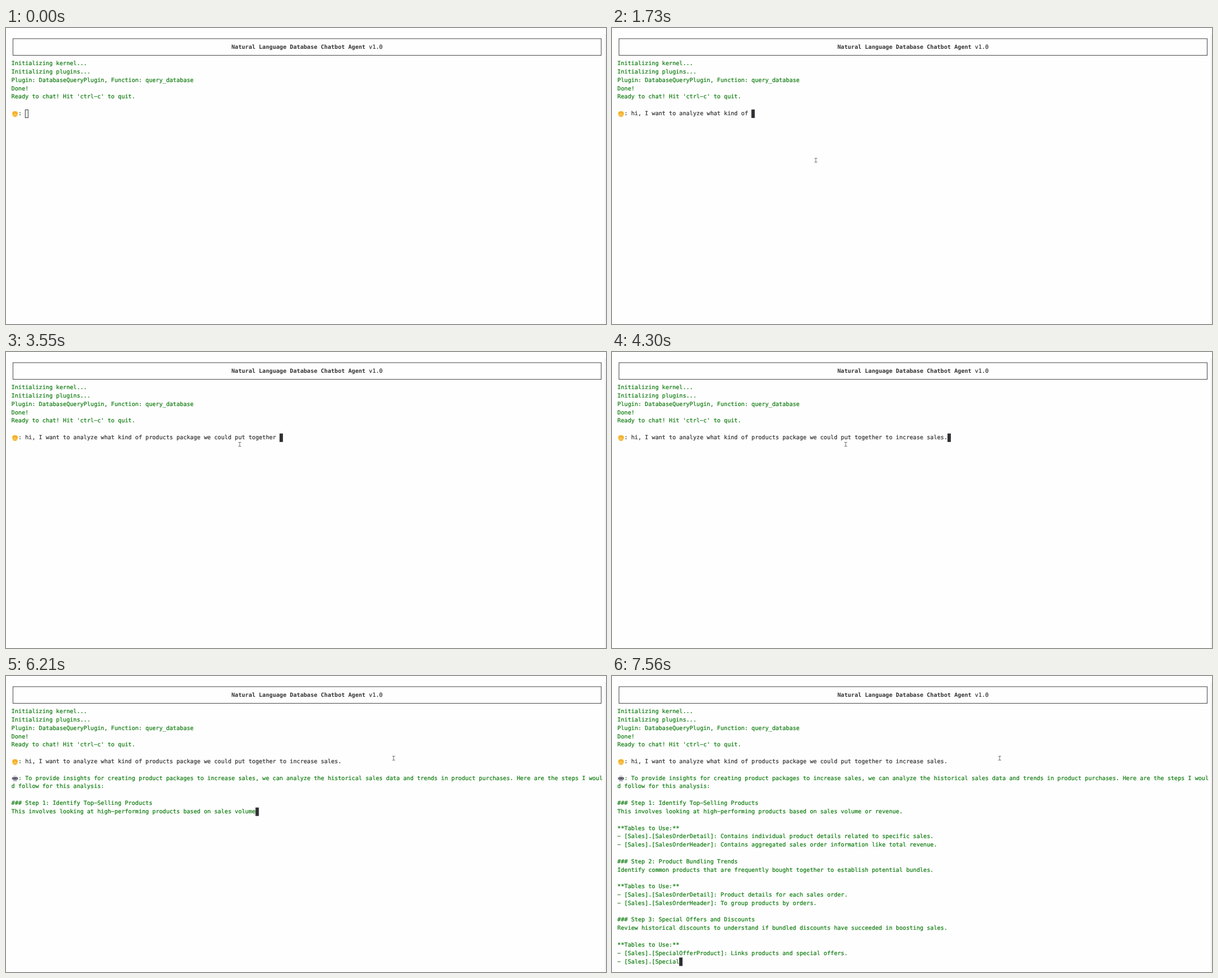
Recreate the animation shown at these times as an HTML page. Size 1064 by 526 pixels, loop 8 s.

```html
<!DOCTYPE html>
<html lang="en">
<head>
<meta charset="utf-8">
<title>Chatbot terminal</title>
<style>
  :root { --lh: 14.81px; --x0: 9.6px; --y0: 57.2px; }
  html, body { margin: 0; width: 100%; height: 100%; overflow: hidden; background: #fefefe; }
  #stage { position: absolute; left: 0; top: 0; width: 1064px; height: 526px; overflow: hidden; }
  #stage > * { position: absolute; }
  pre {
    margin: 0; left: var(--x0); top: calc(var(--y0) + var(--row) * var(--lh));
    font: 10.132px/14.81px "DejaVu Sans Mono", monospace;
    text-rendering: geometricPrecision; font-variant-ligatures: none;
    -webkit-text-stroke: .22px; white-space: pre; color: #333;
  }
  b { -webkit-text-stroke: 0; }
  .green { color: #107c10; }
  #panel { left: 0; top: 0; width: 1064px; height: 56px; }
  #edge { left: 1062px; top: 11px; width: 1px; bottom: 0; background: #e6e6e6; }
  #cursor { left: 0; top: 0; width: 6.1px; height: 14.8px; box-sizing: border-box; background: #303034; }
  #cursor.hollow { background: none; border: 1px solid #303034; }
  .emoji { left: 10.4px; width: 12px; height: 12px; }
  #mouse { left: 0; top: 0; width: 5px; height: 8px; }
</style>
</head>
<body>
<div id="stage">
  <svg id="panel"><rect x="12.35" y="18.97" width="1043.1" height="29.62" fill="none" stroke="#444"/></svg>
  <div id="edge"></div>
  <pre id="title" style="--row:-2"></pre>
  <pre id="boot" class="green" style="--row:0"></pre>
  <pre id="question" style="--row:6"></pre>
  <pre id="answer" class="green" style="--row:8"></pre>
  <svg class="emoji" style="top:146.6px" viewBox="0 0 12 12">
    <path d="M1 5Q1 .8 6 .8Q11 .8 11 5Q11 9 8.6 10.6Q6 12 3.4 10.6Q1 9 1 5Z" fill="#f7b52c"/>
    <path d="M2.4 6Q4.6 5.4 6 3.8Q7.4 5.4 9.6 6Q9.4 10.6 6 10.8Q2.6 10.6 2.4 6Z" fill="#fcc750"/>
    <path d="M1.6 5.4Q4.6 5 6 3.2Q7.4 5 10.4 5.4" fill="none" stroke="#e39a28" stroke-width=".7"/>
    <path d="M4 7h.8M7.2 7h.8M4.8 9.2h2.4" stroke="#c98a2c" stroke-width=".6"/>
  </svg>
  <svg id="robot" class="emoji" style="top:176.2px" viewBox="0 0 12 12">
    <path d="M2 4.4Q2.4 .8 6 .8Q9.6 .8 10 4.4Z" fill="#d4cfdc"/>
    <path d="M1 4v4M11 4v4" stroke="#a59fb4" stroke-width="1.2"/>
    <rect x="1.6" y="4" width="8.8" height="4.2" rx="1" fill="#3a3744"/>
    <circle cx="4.1" cy="6" r=".9" fill="#d9e4ee"/><circle cx="7.9" cy="6" r=".9" fill="#d9e4ee"/>
    <rect x="2" y="8.2" width="8" height="3" rx="1" fill="#cbc5d5"/>
    <path d="M4 9.7h4" stroke="#77708a" stroke-width=".8"/>
  </svg>
  <div id="cursor"></div>
  <svg id="mouse" viewBox="0 0 5 8">
    <path d="M0 .5H5M2.5 .5V7.5M0 7.5H5" fill="none" stroke="#777"/>
  </svg>
</div>
<script>
const LOOP = 8000, CELL = 6.1, LINE = 14.81, LEFT = 9.3, TOP = 56;
const $ = id => document.getElementById(id);
// The terminal face draws hyphens as wide as a minus sign.
const wide = text => text.replace(/-/g, "\u2212");

const BOOT = `Initializing kernel...
Initializing plugins...
Plugin: DatabaseQueryPlugin, Function: query_database
Done!
Ready to chat! Hit 'ctrl-c' to quit.`;

const QUESTION = "hi, I want to analyze what kind of products package we could put together to increase sales.";

const ANSWER = `  : To provide insights for creating product packages to increase sales, we can analyze the historical sales data and trends in product purchases. Here are the steps I woul
d follow for this analysis:

### Step 1: Identify Top-Selling Products
This involves looking at high-performing products based on sales volume or revenue.

**Tables to Use:**
- [Sales].[SalesOrderDetail]: Contains individual product details related to specific sales.
- [Sales].[SalesOrderHeader]: Contains aggregated sales order information like total revenue.

### Step 2: Product Bundling Trends
Identify common products that are frequently bought together to establish potential bundles.

**Tables to Use:**
- [Sales].[SalesOrderDetail]: Product details for each sales order.
- [Sales].[SalesOrderHeader]: To group products by orders.

### Step 3: Special Offers and Discounts
Review historical discounts to understand if bundled discounts have succeeded in boosting sales.

**Tables to Use:**
- [Sales].[SpecialOfferProduct]: Links products and special offers.
- [Sales].[Special`.split("\n");

// Typing bursts: first step, last step, number of steps, characters after the burst
const BURSTS = [
  [410, 460, 2, 4], [600, 600, 1, 10], [740, 890, 4, 17], [1030, 1170, 3, 22],
  [1310, 1310, 1, 25], [1490, 1870, 7, 42], [2010, 2010, 1, 43], [2150, 2150, 1, 44],
  [2470, 2470, 1, 47], [2700, 2700, 1, 49], [2750, 3030, 5, 62], [3170, 3550, 7, 74],
  [3640, 3730, 2, 77], [3870, 4110, 5, 90], [4300, 4300, 1, 92]
];
const THINKING = 4590;
// Streamed answer: time, last line, column in that line
const STREAM = [
  [5940, 4, 64], [6210, 4, 71], [6480, 8, 29], [7020, 11, 33], [7290, 21, 23], [7560, 22, 18]
];
// Pointer: time, left, top
const POINTER = [[130, 359, 231], [2890, 412, 160], [5400, 685, 142]];

const latest = (table, t) => table.filter(([start]) => t >= start).pop();

function typedCount(t) {
  let count = 0;
  for (const [start, end, steps, total] of BURSTS) {
    if (t < start) break;
    const gap = (end - start) / (steps - 1) || 1;
    const step = Math.min(steps, Math.floor((t - start + 0.01) / gap) + 1);
    count += Math.round((total - count) * step / steps);
  }
  return count;
}

function setText(id, text) {
  const node = $(id);
  if (node.textContent !== text) node.textContent = text;
}

function moveTo(node, x, y) {
  node.style.transform = `translate(${x}px, ${y}px)`;
}

function render(t) {
  const thinking = t >= THINKING;
  const count = typedCount(t);
  setText("question", "  : " + QUESTION.slice(0, count));

  let row = 6, col = 4 + count, answer = "";
  if (thinking) {
    const part = latest(STREAM, t);
    if (part) {
      const [, line, column] = part;
      answer = [...ANSWER.slice(0, line), ANSWER[line].slice(0, column)].join("\n");
      row = 8 + line;
      col = column;
    } else {
      answer = "  : Formulating answer...";
      row = 9;
      col = 0;
    }
  }
  setText("answer", wide(answer));
  $("robot").style.display = thinking ? "" : "none";

  $("cursor").className = t < 180 ? "hollow" : "";
  moveTo($("cursor"), LEFT + col * CELL, TOP + row * LINE);

  const pointer = latest(POINTER, t);
  $("mouse").style.display = pointer ? "" : "none";
  if (pointer) moveTo($("mouse"), pointer[1], pointer[2]);
}

$("title").innerHTML = " ".repeat(64) + "<b>Natural Language Database Chatbot Agent</b> v1.0";
setText("boot", wide(BOOT));

const begin = performance.now();
function tick() {
  render((performance.now() - begin) % LOOP);
  requestAnimationFrame(tick);
}
tick();
</script>
</body>
</html>
```
